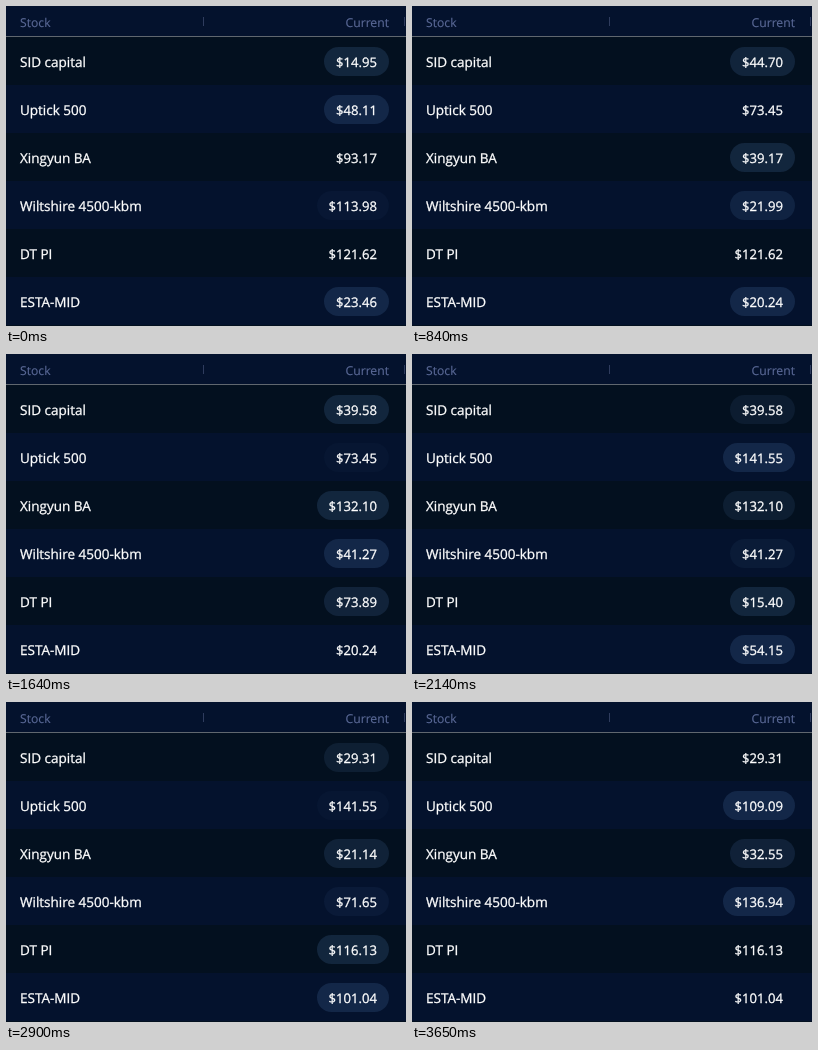
An HTML page for the animation above (3690 ms loop, 400x320 px).

```html
<!DOCTYPE html>
<html lang="en">
<head>
<meta charset="utf-8">
<title>Stock prices</title>
<style>
  html, body { margin: 0; width: 100%; height: 100%; overflow: hidden; background: #04122d; }
  svg { display: block; }
  text { font-family: "Open Sans", "Noto Sans", sans-serif; text-rendering: geometricPrecision; }
  .name, .price { fill: #fff; stroke: #fff; stroke-width: 0.3px; }
  .name { font-size: 13.5px; }
  .price { font-size: 13.1px; text-anchor: end; }
  .head { font-size: 12.2px; fill: #5a6996; stroke: #5a6996; stroke-width: 0.15px; }
  .pill { fill: rgb(82, 125, 180); }
</style>
</head>
<body>
<svg id="stage" width="400" height="320" viewBox="0 0 400 320">
  <rect width="400" height="320" fill="#04122d"/>
  <text class="head" x="14" y="21">Stock</text>
  <text class="head" x="383" y="21" text-anchor="end">Current</text>
  <path d="M197.5 11v9M398.5 11v9" stroke="#2f3c5e"/>
  <rect y="30" width="400" height="1" fill="#60676f"/>
</svg>
<script>
const LOOP = 3690;
const ROW = 48, TOP = 31, DARK = "#03101f";
const DELAY = 40, HOLD = 400, FADE = 500, PEAK = 0.2;
const ROUNDS = [0, 550, 1130, 1640, 2560, 3270, 3650];

// phase: the point within each round at which the stock updates.
// age: how old its first price is when the loop begins.
// prices: the first price, then one per round ("-" means no update).
const stocks = [
  { name: "SID capital", phase: 0.75, age: 300, prices: "14.95 44.70 - 39.58 29.31" },
  { name: "Uptick 500", phase: 0.5, age: 200, prices: "48.11 - 73.45 - 141.55 105.62 109.09" },
  { name: "Xingyun BA", phase: 0.85, age: 1000, prices: "93.17 39.17 113.46 132.10 21.14 32.55" },
  { name: "Wiltshire 4500-kbm", phase: 0.6, age: 775, prices: "113.98 21.99 147.88 41.27 71.65 60.08 136.94" },
  { name: "DT PI", phase: 0.13, age: 1000, prices: "121.62 - - 73.89 15.40 116.13" },
  { name: "ESTA-MID", phase: 0.2, age: 200, prices: "23.46 139.80 20.24 - 54.15 101.04" }
];

const stage = document.getElementById("stage");
const lerp = (a, b, f) => a + (b - a) * f;

function add(tag, attrs, text = "") {
  const el = document.createElementNS("http://www.w3.org/2000/svg", tag);
  for (const key in attrs) el.setAttribute(key, attrs[key]);
  el.textContent = text;
  return stage.appendChild(el);
}

function schedule({ phase, age, prices }) {
  return prices.split(" ")
    .map((price, i) => ({
      text: "$" + price,
      time: i ? lerp(ROUNDS[i - 1], ROUNDS[i], phase) : -age
    }))
    .filter(update => update.text !== "$-");
}

const rows = stocks.map((stock, i) => {
  const y = TOP + i * ROW;
  if (i % 2 === 0) add("rect", { y, width: 400, height: ROW, fill: DARK });
  add("text", { class: "name", x: 14, y: y + 30 }, stock.name);
  return {
    updates: schedule(stock),
    pill: add("rect", { class: "pill", y: y + 10, height: 29, rx: 14.5 }),
    label: add("text", { class: "price", x: 371, y: y + 30 })
  };
});
add("rect", { y: TOP + ROW * stocks.length, width: 400, height: 1, fill: DARK });

function glow(age) {
  return Math.max(0, Math.min(1, 1 - (age - HOLD) / FADE));
}

function render(t) {
  for (const { updates, pill, label } of rows) {
    const { text } = updates.findLast(u => u.time <= t);
    // The highlight restarts slightly after the number changes.
    const flash = updates.findLast(u => u.time + DELAY <= t);
    const width = 23 + 7 * text.length;
    if (label.textContent !== text) label.textContent = text;
    pill.setAttribute("x", 383 - width);
    pill.setAttribute("width", width);
    pill.setAttribute("fill-opacity", PEAK * glow(t - flash.time));
  }
}

const start = performance.now();
function tick() {
  render((performance.now() - start) % LOOP);
  requestAnimationFrame(tick);
}
render(0);
requestAnimationFrame(tick);
</script>
</body>
</html>
```
